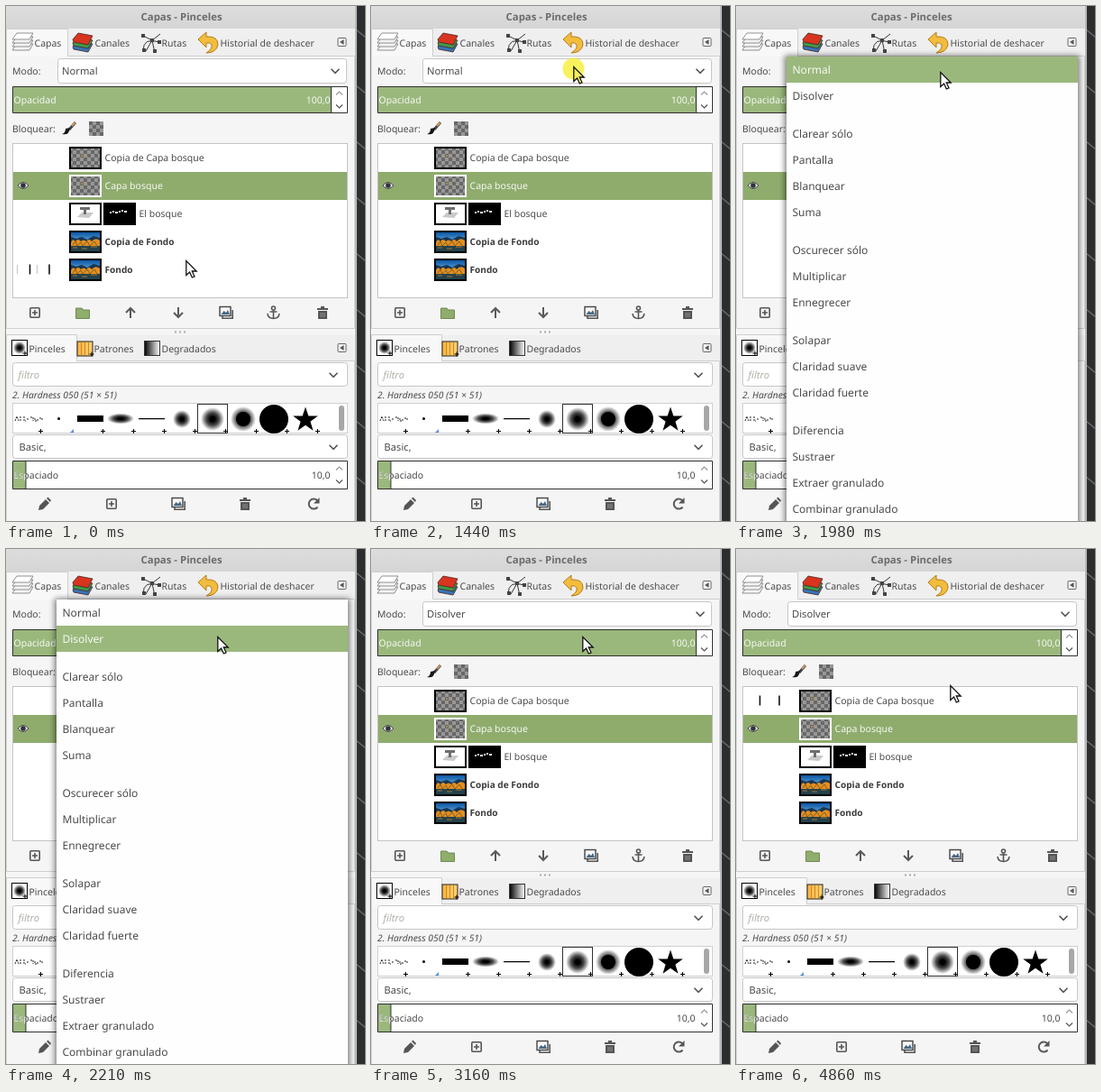
Recreate the animation shown at these times as an HTML page. Size 398 by 571 pixels, loop 5640 ms.

```html
<!DOCTYPE html>
<html lang="es">
<head>
<meta charset="utf-8">
<title>Capas - Pinceles</title>
<style>
  html, body { margin: 0; width: 100%; height: 100%; overflow: hidden; background: #2b2d2e; }
  svg { display: block; width: 398px; height: 571px; }
  text { font: 10.5px "Noto Sans", sans-serif; fill: #4b4b4b; text-rendering: geometricPrecision; white-space: pre; }
  .title { font-size: 11.4px; font-weight: 700; fill: #6b6d6d; }
  .bold { font-size: 10.1px; font-weight: 700; fill: #3c3c3c; }
  .combo { font-size: 11.2px; }
  .item { font-size: 12px; }
  .hint { font-size: 11.2px; font-style: italic; fill: #b0b0a8; }
  .brush { font-size: 10.3px; font-style: italic; }
  .light { fill: #f6f8f3; }
  .end { text-anchor: end; }
  .field { fill: #fff; stroke: #c6c6c6; }
  .frame { fill: none; stroke: #303030; }
  .line { fill: none; stroke: #555; stroke-width: 1.6; }
  .thick { fill: none; stroke: #5a5a5a; stroke-width: 2; }
  .solid { fill: #555; }
</style>
</head>
<body>
<svg viewBox="0 0 398 571">
  <defs>
    <pattern id="checker" width="8" height="8" patternUnits="userSpaceOnUse">
      <rect width="8" height="8" fill="#686868"/>
      <path d="M0 0h4v4h-4zM4 4h4v4h-4z" fill="#979797"/>
    </pattern>
    <radialGradient id="soft"><stop offset=".2"/><stop offset=".55" stop-opacity=".7"/><stop offset="1" stop-opacity="0"/></radialGradient>
    <linearGradient id="fade"><stop/><stop offset="1" stop-color="#fff"/></linearGradient>
    <linearGradient id="wood"><stop stop-color="#ffb43c"/><stop offset="1" stop-color="#ffd273"/></linearGradient>
    <linearGradient id="sky" x2="0" y2="1"><stop stop-color="#0a57a6"/><stop offset="1" stop-color="#79b6df"/></linearGradient>
    <linearGradient id="bar" x2="0" y2="1"><stop stop-color="#dcdddc"/><stop offset="1" stop-color="#d4d5d4"/></linearGradient>
    <filter id="blur" x="-10%" y="-10%" width="120%" height="120%"><feGaussianBlur stdDeviation="3"/></filter>
    <clipPath id="spacing"><path d="M8 505h14v30h-14z"/></clipPath>
    <path id="down" class="line" d="M-4.5 -2.3L0 2.3L4.5 -2.3"/>
    <g id="spin" fill="none" stroke-width="1.2">
      <path d="M-3.5 -5.5L0 -9L3.5 -5.5" stroke="#999"/>
      <path d="M-3.5 5.5L0 9L3.5 5.5" stroke="#555"/>
    </g>
    <g id="tabmenu">
      <rect x="-4.5" y="-4.5" width="9" height="9" rx="1" fill="#f5f5f5" stroke="#666"/>
      <path d="M2 -3V3L-2.5 0z" class="solid"/>
    </g>
    <g id="new">
      <rect x="-5.2" y="-5.2" width="10.4" height="10.4" rx="1" class="line"/>
      <path d="M-3 0H3M0 -3V3" class="line"/>
    </g>
    <path id="up" class="thick" d="M0 6V-5M-5 0L0 -5L5 0"/>
    <g id="copy">
      <path d="M-4 -3V6.2H7.2V-3" class="line"/>
      <rect x="-7" y="-6.5" width="12" height="10" fill="#f7f7f7" stroke="#444" stroke-width="1.4"/>
      <path d="M-5.5 2L-2.5 -2L0 0L2 -3L4 2z" fill="#476884"/>
    </g>
    <g id="trash">
      <path d="M-6 -5H6V-3H-6zM-2 -7H2V-5H-2zM-5 -2H5V7H-5z" class="solid"/>
      <path d="M-2 0V5M0 0V5M2 0V5" stroke="#aaa" stroke-width=".7"/>
    </g>
    <g id="sheer">
      <rect width="36" height="25" fill="url(#checker)"/>
      <path d="M13 10h2M17 9h2M15 13h1M20 12h1" stroke="#b39a56" stroke-width="1.3"/>
    </g>
    <g id="forest">
      <rect width="36" height="25"/>
      <rect x="2" y="2" width="32" height="13" fill="url(#sky)"/>
      <path d="M2 7L8 9L14 7L20 10L27 6L34 8V15H2z" fill="#183551"/>
      <path d="M2 13Q4 8 7 12Q10 8 13 12Q16 9 19 12Q22 8 25 12Q29 7 34 11V18H2z" fill="#e38e20"/>
      <path d="M4 16L7 12L9 17L13 13L15 17L20 12L23 17L28 12L31 17" fill="none" stroke="#7d6324"/>
      <path d="M2 17H34V23H2z" fill="#24424c"/>
      <path d="M4 19h5M14 20h6M24 18h7" stroke="#a9772d"/>
    </g>
    <path id="plus" d="M-2.5 0H2.5M0 -2.5V2.5" stroke="#000"/>
  </defs>

  <rect width="398" height="571" fill="#2b2d2e"/>
  <path id="stripes" stroke="#64686a" stroke-width="1.6"/>
  <rect width="389" height="571" fill="#b5b6b6"/>
  <rect width="387" height="571" fill="#f5f5f5"/>
  <rect width="387" height="25" fill="url(#bar)"/>
  <text class="title" x="149.5" y="16">Capas - Pinceles</text>

  <!-- upper tabs -->
  <path d="M0 25H387V55H0z" fill="#efefef"/>
  <path d="M0 25H68V56H0z" fill="#f8f8f8"/>
  <path d="M0 25.5H68.5V55.5H386.5V357.5H.5V25" fill="none" stroke="#cfcfcf"/>
  <g stroke="#777" stroke-width=".8" fill="#f3f3f3">
    <path d="M7 49L12 42H30L26 49z"/><path d="M7 45L12 38H30L26 45z"/><path d="M7 41L12 34H30L26 41z"/><path d="M7 37L12 30H30L26 37z" fill="#fff"/>
  </g>
  <g stroke="#4c2420" stroke-width=".8">
    <path d="M74 45L80 38L96 42L91 51L75 48z" fill="#3774b8"/>
    <path d="M74 41L80 34L96 38L91 47L75 44z" fill="#3f9a48"/>
    <path d="M74 37L80 30L96 33L91 43L75 40z" fill="#d8341f"/>
  </g>
  <path d="M152 50Q152 34 170 40M152 33L162 38L165 52M155 50L162 38L171 31" fill="none" stroke="#333"/>
  <path d="M150 31h4v4h-4zM160 36h4v4h-4zM168 38h4v4h-4zM163 48h4v4h-4zM151 47h4v4h-4z" fill="#444"/>
  <path d="M213 37L222 29V34Q235 33 235 43Q233 52 222 52Q229 48 228 43Q226 40 222 41V46z" fill="#f3bc3d" stroke="#b67b19"/>
  <text x="31.5" y="45">Capas</text><text x="98.5" y="45">Canales</text><text x="172.5" y="45">Rutas</text><text x="237.5" y="45">Historial de deshacer</text>
  <use href="#tabmenu" x="372.5" y="40"/>

  <!-- mode, opacity and locks -->
  <text x="7" y="76">Modo:</text>
  <rect x="57.5" y="58.5" width="320" height="27" rx="3" class="field"/>
  <text id="mode" class="combo" x="62" y="76"></text>
  <use href="#down" x="365" y="72"/>
  <rect x="7.5" y="89.5" width="371" height="29" fill="#fff"/>
  <rect x="8" y="90" width="352" height="28" fill="#9ab87c"/>
  <path class="frame" d="M7.5 89.5H378.5V118.5H7.5zM360.5 90V118"/>
  <text class="light" x="8.5" y="108">Opacidad</text><text class="light end" x="359.5" y="108">100,0</text>
  <use href="#spin" x="369.5" y="104"/>
  <text x="7" y="140">Bloquear:</text>
  <path d="M77 129L70 137" stroke="#444" stroke-width="3"/><path d="M77 129L73 133" stroke="#c59a60" stroke-width="2"/><path d="M71 135Q70 144 62 142Q66 141 66 136z" fill="#161616"/>
  <rect x="92" y="128" width="16" height="16" fill="url(#checker)"/>

  <!-- layer list -->
  <rect x="7.5" y="152.5" width="371" height="171" fill="#fff" stroke="#c4c4c4"/>
  <rect x="8" y="184" width="370" height="31" fill="#8fac6d"/>
  <g fill="none" stroke-width="2">
    <use href="#sheer" x="70" y="156"/><rect x="71" y="157" width="34" height="23" stroke="#000"/>
    <use href="#sheer" x="70" y="187"/><rect x="71" y="188" width="34" height="23" stroke="#fff"/>
    <rect x="71" y="219" width="34" height="23" fill="#fff" stroke="#000"/>
  </g>
  <path d="M79 234L84 229H97L92 235z" fill="#c9c9c9"/><path d="M82 223H93V226H89V231H86V226H82z" fill="#6d6d6d"/>
  <rect x="108" y="218" width="36" height="25"/>
  <path d="M115 229h2M118 228h2M121 229h3M125 228h2M128 227h2M131 228h3" stroke="#eee" stroke-width="2"/>
  <use href="#forest" x="70" y="249"/><use href="#forest" x="70" y="280"/>
  <text x="109.5" y="172">Copia de Capa bosque</text>
  <text class="light" x="109.5" y="203">Capa bosque</text>
  <text x="147.5" y="234">El bosque</text>
  <text class="bold" x="109.5" y="265">Copia de Fondo</text>
  <text class="bold" x="109.5" y="296">Fondo</text>
  <path d="M13 199Q19 192 25 199Q19 206 13 199z" fill="#eee" stroke="#454545"/><circle cx="19" cy="199" r="2.8" fill="#30343c"/>
  <g id="hover">
    <path d="M26.5 -5.5V5.5M48 -5.5V5.5" stroke="#111" stroke-width="1.6"/>
    <path id="ghost" d="M12.5 -5V5M34.5 -5V5" stroke="#c4c4c4"/>
  </g>
  <use href="#new" x="32" y="340"/>
  <path d="M77.5 335H84L86 337H92.5V346.5H77.5z" fill="#8fad6c" stroke="#728b55"/>
  <use href="#up" x="138" y="340"/>
  <use href="#up" transform="translate(191 340) scale(1 -1)"/>
  <use href="#copy" x="244" y="340"/>
  <g transform="translate(296.5 340)"><circle cy="-5" r="2" class="line"/><path d="M0 -3V6M-4 -1H4M-6.5 1Q-6 6.5 0 6.5Q6 6.5 6.5 1" class="line"/></g>
  <use href="#trash" x="351" y="340"/>
  <path d="M187 361.5h2m3 0h2m3 0h2" stroke="#aaa" stroke-width="2"/>

  <!-- lower tabs -->
  <path d="M0 365H387V394H0z" fill="#efefef"/>
  <path d="M0 365H78V395H0z" fill="#f8f8f8"/>
  <path d="M.5 571V364.5H78.5V393.5H386.5V571" fill="none" stroke="#cfcfcf"/>
  <rect x="6.5" y="370.5" width="17" height="17" fill="#fff" stroke="#000"/><circle cx="15" cy="379" r="7" fill="url(#soft)"/><use href="#plus" x="21" y="385"/>
  <rect x="79" y="372" width="17" height="16" fill="url(#wood)" stroke="#222"/><path d="M83.5 373V387M87.5 373V387M91.5 373V387" stroke="#b97922" stroke-width=".8"/><use href="#plus" x="95" y="386"/>
  <rect x="153.5" y="371.5" width="17" height="16" fill="url(#fade)" stroke="#333"/>
  <text x="25.5" y="384">Pinceles</text><text x="97.5" y="384">Patrones</text><text x="172.5" y="384">Degradados</text>
  <use href="#tabmenu" x="372.5" y="379"/>

  <!-- brushes -->
  <rect x="7.5" y="395.5" width="371" height="26" rx="3" class="field"/>
  <text class="hint" x="13.5" y="413">filtro</text>
  <use href="#down" x="363" y="409"/>
  <text class="brush" x="7" y="435">2. Hardness 050 (51 × 51)</text>
  <rect x="7.5" y="440.5" width="371" height="33" fill="#fff" stroke="#d0d0d0"/>
  <path d="M10 460l2 -5l2 5M16 455v5M20 455v5h2M24 457v3M27 456h3v4M32 457v3h3v-3M37 457h3v3" fill="none" stroke="#222" stroke-dasharray="2 1"/>
  <circle cx="58.5" cy="457.5" r="1.5"/>
  <path d="M79 454H108V461H79zM147 457H176V458.3H147z"/>
  <ellipse cx="127" cy="457.5" rx="15" ry="6" fill="url(#soft)"/>
  <circle cx="195" cy="458" r="10" fill="url(#soft)"/>
  <circle cx="229" cy="458" r="13" fill="url(#soft)"/>
  <circle cx="263" cy="458" r="14" fill="url(#soft)"/><circle cx="263" cy="458" r="8"/>
  <circle cx="297" cy="458" r="16"/>
  <path id="star"/>
  <rect x="212.5" y="441.5" width="33" height="32" class="frame"/>
  <g id="pluses"></g>
  <path d="M71 473L75 469V473z" fill="#5c8fd6"/>
  <rect x="369" y="443" width="6" height="28" rx="3" fill="#a7a7a7"/>
  <rect x="7.5" y="475.5" width="371" height="26" rx="3" class="field"/>
  <text class="combo" x="14.5" y="493">Basic,</text>
  <use href="#down" x="363" y="489"/>
  <rect x="7.5" y="504.5" width="371" height="31" fill="#fff"/>
  <rect x="8" y="505" width="14" height="30" fill="#9ab87c"/>
  <path class="frame" d="M7.5 504.5H378.5V535.5H7.5zM22 505V535"/>
  <text x="8.5" y="524">Espaciado</text><text class="light" clip-path="url(#spacing)" x="8.5" y="524">Espaciado</text>
  <text class="end" x="359.5" y="524">10,0</text>
  <use href="#spin" x="369.5" y="520"/>
  <path d="M36 559L37 554L44 547L48 551L41 558zM45 546L46.5 544.5L50 548L49 550z" class="solid"/>
  <use href="#new" x="117" y="552"/><use href="#copy" x="191" y="552"/><use href="#trash" x="265" y="552"/>
  <path d="M345.5 555.5A5.5 5.5 0 1 1 345 548" class="thick"/><path d="M347.5 545V551.5H341z" class="solid"/>

  <g id="menu">
    <rect x="54" y="55" width="327" height="525" fill="#000" opacity=".5" filter="url(#blur)"/>
    <rect x="56" y="56" width="323" height="515" fill="#fefefe"/>
    <rect id="highlight" x="56" width="323" height="29" fill="#9ab87c"/>
  </g>
  <circle id="press" cx=".5" cy="2.5" r="12" fill="#f5ee28" opacity=".75"/>
  <path id="cursor" d="M.8 .5V16.5L4.6 13L7.3 19L10 17.8L7.3 12H12.2z" stroke="#111" stroke-width="1.3"/>
</svg>
<script>
const LOOP = 5640;
const MENU_OPENS = 1510, MENU_CLOSES = 3160;
const MENU_TOP = 56, ITEM_HEIGHT = 29, GROUP_GAP = 13;
const LIST_TOP = 150, ROW_HEIGHT = 31, SELECTED_ROW = 1, LAST_ROW = 4;
const $ = id => document.getElementById(id);

const add = (parent, tag, attrs, text = "") => {
  const node = document.createElementNS("http://www.w3.org/2000/svg", tag);
  for (const name in attrs) node.setAttribute(name, attrs[name]);
  node.textContent = text;
  return parent.appendChild(node);
};

const groups = [
  ["Normal", "Disolver"],
  ["Clarear sólo", "Pantalla", "Blanquear", "Suma"],
  ["Oscurecer sólo", "Multiplicar", "Ennegrecer"],
  ["Solapar", "Claridad suave", "Claridad fuerte"],
  ["Diferencia", "Sustraer", "Extraer granulado", "Combinar granulado"]
];
const items = [];
let itemTop = MENU_TOP;
for (const group of groups) {
  for (const name of group) {
    items.push(add($("menu"), "text", { class: "item", x: 62.5, y: itemTop + 18.5 }, name));
    itemTop += ITEM_HEIGHT;
  }
  itemTop += GROUP_GAP;
}

for (const x of [38, 107, 141, 175, 209, 243, 277, 311, 345])
  add($("pluses"), "use", { href: "#plus", x: x + .5, y: 471.5 });

$("star").setAttribute("d", "M" + Array.from({ length: 10 }, (_, i) => {
  const r = i % 2 ? 5.7 : 14.5, a = i * Math.PI / 5;
  return [332 + r * Math.sin(a), 459 - r * Math.cos(a)];
}).join("L") + "z");

$("stripes").setAttribute("d", Array.from({ length: 10 }, (_, i) => `M388 ${26 + i * 62}l11 9`).join(""));

// Each move: first and last step time, step count, destination, easing.
const linear = p => p, easeOut = p => 1 - (1 - p) ** 2;
const moves = [
  [360, 670, 5, 227, 166, linear],
  [750, 900, 3, 227, 111, easeOut],
  [980, 1360, 6, 224, 67, easeOut],
  [1910, 2210, 5, 234, 97, linear],
  [4630, 4860, 4, 237, 151, linear]
];

function pointer(t) {
  let x = 199, y = 282;
  for (const [first, last, steps, toX, toY, ease] of moves) {
    if (t < first) break;
    const step = Math.floor((t - first) / (last - first) * (steps - 1) + .01) + 1;
    const p = ease(Math.min(step / steps, 1));
    x += (toX - x) * p;
    y += (toY - y) * p;
  }
  return [Math.round(x), Math.round(y)];
}

const show = (id, on) => $(id).style.display = on ? "" : "none";
const within = (t, from, to) => t >= from && t < to;

function draw(t) {
  const [x, y] = pointer(t);
  const pressed = within(t, 1440, 1590) || within(t, 2920, 3070);
  for (const id of ["cursor", "press"]) $(id).setAttribute("transform", `translate(${x} ${y})`);
  $("cursor").setAttribute("fill", pressed ? "#f5ee5c" : "#fff");
  show("press", pressed);

  show("menu", within(t, MENU_OPENS, MENU_CLOSES));
  const active = y < MENU_TOP + ITEM_HEIGHT ? 0 : 1;
  $("highlight").setAttribute("y", MENU_TOP + ITEM_HEIGHT * active);
  items.forEach((item, i) => item.classList.toggle("light", i === active));
  $("mode").textContent = t < MENU_CLOSES ? "Normal" : "Disolver";

  // The row under the pointer reveals its empty visibility toggle.
  const row = Math.floor((y - LIST_TOP) / ROW_HEIGHT);
  show("hover", within(row, 0, LAST_ROW + 1) && row !== SELECTED_ROW);
  show("ghost", row === LAST_ROW);
  $("hover").setAttribute("transform", `translate(0 ${168 + ROW_HEIGHT * row})`);
}

function animate(now) {
  draw(now % LOOP);
  requestAnimationFrame(animate);
}
draw(0);
requestAnimationFrame(animate);
</script>
</body>
</html>
```
